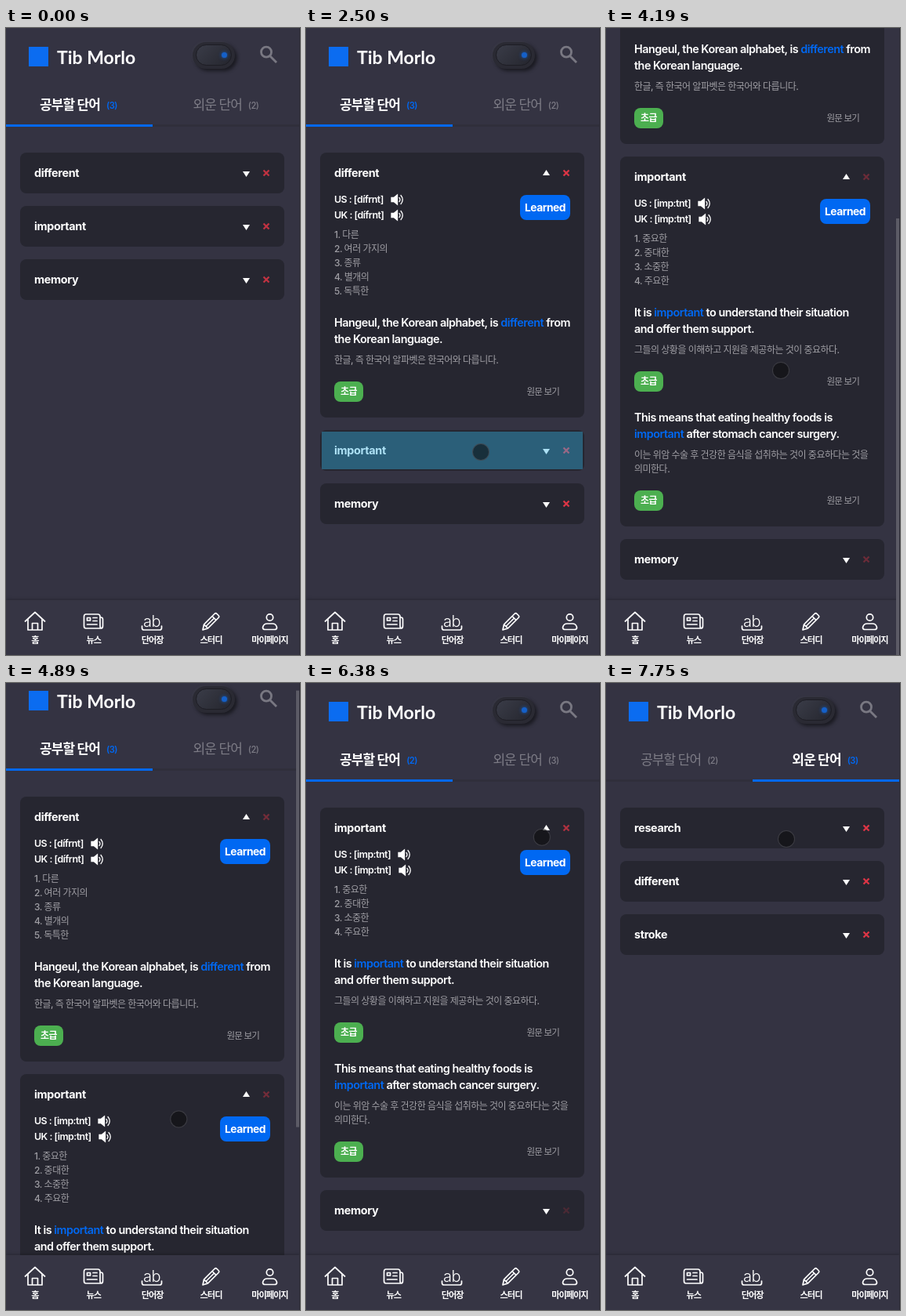
These frames come from a looping animation (375 by 800 pixels, 8 s). An HTML page:

```html
<!DOCTYPE html>
<html lang="ko">
<head>
<meta charset="utf-8">
<title>Word list</title>
<style>
  * { box-sizing: border-box; margin: 0; padding: 0 }
  html, body { width: 100%; height: 100%; overflow: hidden; background: #343342 }
  body { position: relative; color: #fff; white-space: nowrap; letter-spacing: -.5px;
    font-family: Inter, "Noto Sans CJK KR", "Noto Sans CJK", sans-serif }
  #page, #nav, #thumb, #cursor, #edge, .logo, .brand, .toggle, .find, .tab, .list, .tap, .title, .arrow, .del, .learn { position: absolute }
  #page { left: 0; top: 0; width: 374px }
  .logo { left: 29px; top: 24px; width: 25px; height: 25px; background: #0b6cf0 }
  .brand { left: 65px; top: 22px; font: 700 23px/30px Lato, sans-serif; letter-spacing: 0 }
  .toggle { left: 238px; top: 18px; width: 54px; height: 34px; border-radius: 17px; background: #2a2a33;
    box-shadow: 3px 3px 4px #1b1b22, -1px -1px 2px #3a3a47 }
  .toggle i { position: absolute; left: 4px; top: 3px; width: 46px; height: 27px; border-radius: 14px;
    border: 1px solid #1d1d24; background: linear-gradient(135deg, #3a3c48, #25262e) }
  .toggle b { position: absolute; left: 36.5px; top: 12.5px; width: 7px; height: 7px; border-radius: 4px;
    background: #1560c8; box-shadow: 0 0 4px #1560c8 }
  .find { left: 323px; top: 21px }
  .tab { top: 70px; width: 187px; height: 56px; display: flex; justify-content: center; align-items: center; gap: 8px;
    border-bottom: 3px solid #302f3b; color: #7d7c86; font-size: 17px; letter-spacing: -1px }
  .tab span { position: relative; top: 2px; font-size: 11.2px; font-weight: 500; letter-spacing: -.5px }
  .tab.on { padding-right: 2px; color: #fff; font-weight: 700; letter-spacing: -.85px; border-color: #0068f2 }
  .tab.on span { font-weight: 600 }
  .tab.on span, em { color: #0068f2; font-style: normal }
  .tap { background: rgba(51, 181, 229, .4); opacity: 0 }
  .list { left: 18px; top: 159px; width: 337px }
  .card { position: relative; height: 52px; margin-bottom: 16px; padding: 50px 18px 0; border-radius: 8px;
    background: #262630; overflow: hidden }
  .title { left: 18px; top: 0; font: 700 14.4px/52px Inter, sans-serif; letter-spacing: -.35px }
  .arrow { left: 284px; top: 24px; width: 9px; height: 7px; background: #fff;
    clip-path: polygon(0 0, 100% 0, 50% 100%); transform-origin: 50% 2.5px }
  .del { left: 309px; top: 21px }
  .card .tap { left: 2px; top: 2px; width: 333px; height: 48px }
  .learn { left: 255px; top: 54px; width: 64px; height: 32px; border-radius: 8px; background: #0068f2;
    text-align: center; font-size: 13.8px; line-height: 32px; font-weight: 700; overflow: hidden }
  .learn .tap { left: 0; top: 0; width: 64px; height: 32px }
  .say { height: 20px; line-height: 20px; font-size: 12.4px; font-weight: 600; display: flex; align-items: center; gap: 9px }
  .means { margin: 6px 0 -2px }
  .means, .ko { font-size: 12px; line-height: 18px; font-weight: 500; color: #9f9ea4 }
  .en { margin: 21.5px 0 8.5px; font-size: 14.4px; line-height: 21px; font-weight: 600 }
  .foot { margin-top: 18px; padding-right: 14px; display: flex; justify-content: space-between; line-height: 26px;
    font-size: 11.5px; letter-spacing: -.8px; color: #9f9ea4 }
  .foot b { width: 37px; border-radius: 8px; background: #4caf50; color: #fff; text-align: center; font-size: 12px; letter-spacing: -.5px }
  #nav { left: 0; top: 730px; width: 375px; height: 70px; background: #363544; box-shadow: 0 -1px 4px rgba(0, 0, 0, .25) }
  #nav text { fill: #fff; font-size: 11.2px; font-weight: 600; letter-spacing: -1px; text-anchor: middle }
  #thumb { left: 370px; top: 0; width: 4px; height: 557px; background: #5c5b66 }
  #edge { left: 374px; top: 0; width: 1px; height: 800px; background: #2a2934 }
  #cursor { left: -10.5px; top: -10.5px; width: 22px; height: 22px; border-radius: 50%;
    background: rgba(12, 12, 14, .57); border: 1.5px solid rgba(115, 115, 125, .4) }
</style>
</head>
<body>
<div id="page">
  <div class="logo"></div>
  <div class="brand">Tib Morlo</div>
  <div class="toggle"><i></i><b></b></div>
  <svg class="find" width="26" height="26" fill="none" stroke="#797882" stroke-width="2.8">
    <circle cx="9" cy="9.7" r="6.5"/><path d="M13.500 14.500L22 23"/></svg>
  <div class="tab" style="left:0">공부할 단어<span></span></div>
  <div class="tab" style="left:187px">외운 단어<span></span></div>
  <div class="tap" id="tabTap" style="left:187px;top:70px;width:187px;height:56px"></div>
  <div class="list" id="study"></div>
  <div class="list" id="done"></div>
</div>
<svg id="nav" fill="none" stroke="#fff" stroke-width="1.7" stroke-linejoin="round" stroke-linecap="round">
  <path d="M24.500 27L37 15.500L49.500 27M28 24.500V38H46V24.500M33.500 38V29.500H40.500V38"/>
  <path d="M102 18H117Q120 18 120 21V33Q120 36 122 36H102Q99.500 36 99.500 33V21Q99.500 18 102 18M120 22H121Q123.500 22 123.500 24.500V33Q123.500 36 121 36M103.500 22.500H107.500V26H103.500ZM111 22.500H116M111 26.500H116M103.500 31H116"/>
  <path d="M173.500 33V35.500Q173.500 38 176 38H196Q198.500 38 198.500 35.500V33"/>
  <path d="M251 38L252.500 31L266 17.500Q267.500 16 269 17.500L271 19.500Q272.500 21 271 22.500L257.500 36ZM263 20.500L268 25.500M252.500 31L257.500 36M256 32.500L265 23.500"/>
  <circle cx="336.500" cy="22" r="4.200"/>
  <path d="M330.500 37.500Q327.500 37.500 327.500 35Q328.500 30 333 30H340Q344.500 30 345.500 35Q345.500 37.500 342.500 37.500Z"/>
  <g stroke="none" id="labels"><text x="186" y="34" style="font-size:20px;font-weight:300;letter-spacing:-.5px">ab</text></g>
</svg>
<div id="thumb"></div>
<div id="edge"></div>
<div id="cursor"></div>
<script>
const $ = id => document.getElementById(id);
const clamp = v => Math.min(1, Math.max(0, v));
const ramp = (t, a, b) => clamp((t - a) / (b - a));
const easeOut = x => 1 - (1 - x) ** 3;
const ease = x => 1 - (1 - x) ** 3 * (1 + 1.6 * x);

// Linear interpolation through rows of [time, ...values]
function track(rows, t) {
  const i = rows.findIndex(r => r[0] > t);
  if (i < 0) return rows[rows.length - 1].slice(1);
  if (i === 0) return rows[0].slice(1);
  const a = rows[i - 1], b = rows[i], k = ramp(t, a[0], b[0]);
  return a.slice(1).map((v, j) => v + (b[j + 1] - v) * k);
}

const speaker = `<svg width="17" height="16" fill="none" stroke="#fff" stroke-width="1.3" stroke-linecap="round">
  <path d="M1 5.500H4L8.500 1.800V14.200L4 10.500H1Z" fill="#fff"/><path d="M11 5.500Q13 8 11 10.500M13 2.500Q17.500 8 13 13.500"/></svg>`;

const body = ({ ipa, means, examples }) => `
  <div class="learn">Learned<div class="tap"></div></div>
  ${['US', 'UK'].map(c => `<div class="say">${c} : [${ipa}]${speaker}</div>`).join('')}
  <div class="means">${means.map((m, i) => `${i + 1}. ${m}<br>`).join('')}</div>
  ${examples.map(([en, ko]) => `<div class="en">${en}</div><div class="ko">${ko}</div>
    <div class="foot"><b>초급</b>원문 보기</div>`).join('')}`;

function addCard(list, word, info) {
  const el = document.createElement('div');
  el.className = 'card';
  el.innerHTML = `<div class="title">${word}</div><div class="arrow"></div>
    <svg class="del" width="10" height="10" stroke="#dc3545" stroke-width="2.300"><path d="M1.500 1.500L8.500 8.500M8.500 1.500L1.500 8.500"/></svg>
    ${info ? body(info) : ''}<div class="tap head"></div>`;
  list.append(el);
  const q = s => el.querySelector(s);
  return { el, arrow: q('.arrow'), del: q('.del'), tap: q('.head'), learnTap: q('.learn .tap') };
}

const different = addCard($('study'), 'different', {
  ipa: 'dífrnt',
  means: ['다른', '여러 가지의', '종류', '별개의', '독특한'],
  examples: [['Hangeul, the Korean alphabet, is <em>different</em> from<br>the Korean language.',
    '한글, 즉 한국어 알파벳은 한국어와 다릅니다.']]
});
const important = addCard($('study'), 'important', {
  ipa: 'imp:tnt',
  means: ['중요한', '중대한', '소중한', '주요한'],
  examples: [
    ['It is <em>important</em> to understand their situation<br>and offer them support.',
      '그들의 상황을 이해하고 지원을 제공하는 것이 중요하다.'],
    ['This means that eating healthy foods is<br><em>important</em> after stomach cancer surgery.',
      '이는 위암 수술 후 건강한 음식을 섭취하는 것이 중요하다는 것을<br>의미한다.']]
});
const memory = addCard($('study'), 'memory');
['research', 'different', 'stroke'].forEach(w => addCard($('done'), w));

$('labels').innerHTML += ['홈', '뉴스', '단어장', '스터디', '마이페이지']
  .map((s, i) => `<text x="${36.8 + 74.9 * i}" y="55">${s}</text>`).join('');

const cursorPath = [
  [730, 313, 273], [1210, 211, 194], [2070, 211, 194], [2430, 222, 540], [2950, 222, 540],
  [3270, 230, 624], [3380, 230, 624], [3810, 223, 450], [4120, 223, 450], [4190, 222, 436],
  [4270, 222, 431], [4410, 222, 431], [4680, 219, 557], [4890, 219, 557], [5160, 303, 156],
  [5200, 303, 156], [5370, 308, 245], [5900, 308, 245], [6120, 311, 232], [6310, 311, 232],
  [6380, 300, 196], [6660, 267, 99], [7400, 267, 99], [7750, 229, 198]
];
const delFade = [[1670, .85], [1810, .6], [2430, 1], [3320, 1], [3810, .38], [4410, .38], [5160, .45], [5510, .45], [6120, .75]];
const tabs = [...document.querySelectorAll('.tab')];

function setTap(el, t, start) {
  el.style.opacity = t < start ? 0 : 1 - ramp(t, start + 180, start + 300);
}

function setOpen(card, t, start, full) {
  const k = ease(ramp(t, start, start + 500));
  card.el.style.height = 52 + (full - 52) * k + 'px';
  card.arrow.style.transform = `rotate(${-180 * k}deg)`;
}

function draw(now) {
  const t = now % 8000;
  const learned = t >= 5650, second = t >= 7130;

  setOpen(different, t, 1740, 338);
  setOpen(important, t, 2570, 472);
  setTap(different.tap, t, 1670);
  setTap(important.tap, t, 2500);
  setTap(different.learnTap, t, 5510);
  setTap($('tabTap'), t, 6990);

  const fade = track(delFade, t)[0];
  different.del.style.opacity = important.del.style.opacity = fade;
  memory.del.style.opacity = learned ? .2 : fade;

  different.el.style.display = learned ? 'none' : '';
  $('study').style.display = second ? 'none' : '';
  $('done').style.display = second ? '' : 'none';
  tabs.forEach((tab, i) => {
    tab.classList.toggle('on', second === (i === 1));
    tab.lastChild.textContent = learned === (i === 1) ? '(3)' : '(2)';
  });

  const scroll = 349 * (easeOut(ramp(t, 3380, 3810)) - easeOut(ramp(t, 4410, 5140)));
  $('page').style.transform = `translateY(${-Math.round(scroll)}px)`;
  $('thumb').style.transform = `translateY(${scroll * 800 / 1149}px)`;
  $('thumb').style.opacity = t > 3380 ? 1 - ramp(t, 5510, 5650) : 0;

  const [x, y] = track(cursorPath, t);
  $('cursor').style.transform = `translate(${x}px, ${y}px)`;
  $('cursor').style.opacity = t >= 730 ? 1 : 0;
  requestAnimationFrame(draw);
}
requestAnimationFrame(draw);
</script>
</body>
</html>
```
